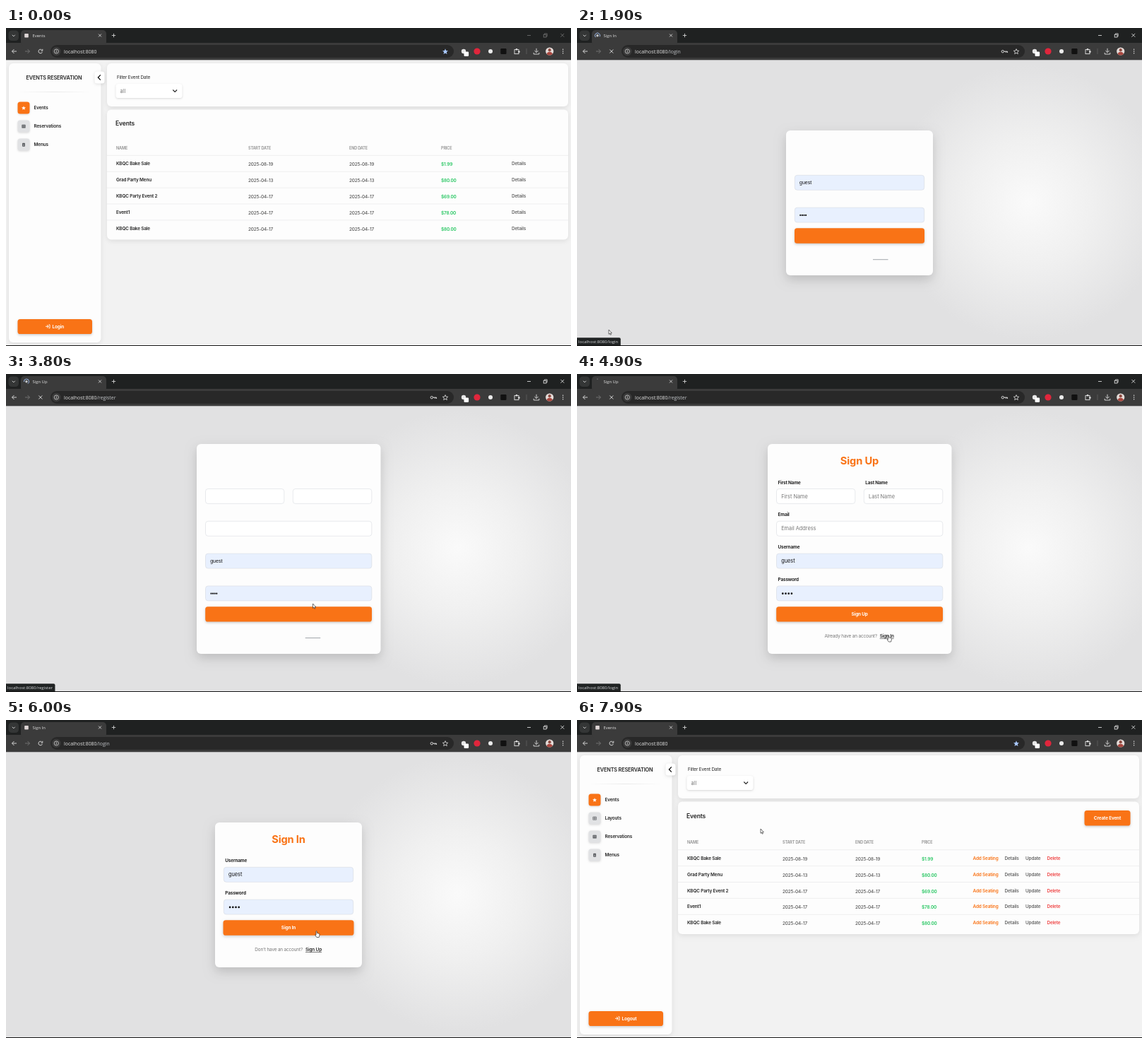
Animation, 800 px wide and 450 px high, one loop 8 s. Source, as an HTML page with a canvas:

```html
<!DOCTYPE html>
<html lang="en">
<head>
<meta charset="utf-8">
<title>Events Reservation</title>
<style>
html, body { margin: 0; width: 100%; height: 100%; overflow: hidden; background: #f2f2f2; }
canvas { display: block; width: 800px; height: 450px; }
</style>
</head>
<body>
<canvas id="stage"></canvas>
<script>
const canvas = document.getElementById('stage');
const ctx = canvas.getContext('2d');
const dpr = window.devicePixelRatio || 1;
canvas.width = 800 * dpr;
canvas.height = 450 * dpr;

const LOOP = 8000;
const INTER = 'Inter, "Liberation Sans", sans-serif';
const UI = '"Open Sans", "Noto Sans", sans-serif';
const ORANGE = '#f97316', INK = '#222', GRAY = '#666', GREEN = '#22c55e', RED = '#ef4444';
const USER = 'guest';

// time, x, y of the pointer tip
const PATH = [
  [100, 768, 13], [900, 45, 427], [2200, 45, 427], [3200, 434.5, 325],
  [3950, 434.5, 325], [4500, 441, 370], [5500, 441, 370],
  [6100, 439.5, 293], [7200, 439.5, 293], [7900, 260, 154]
];

// start, view, ready (web fonts present)
const PAGES = [
  [0, 'events', true], [1900, 'login', false], [2100, 'login', true],
  [3700, 'register', false], [3900, 'register', true],
  [5000, 'login', false], [5200, 'login', true],
  [6600, 'blank', false], [6800, 'manage', false], [6900, 'manage', true]
];

// click, commit, end of loading
const LOADS = [[1700, 1900, 2300], [3600, 3700, 4100], [4900, 5000, 5400], [6300, 6600, 7100]];
const STATUS = [[1000, 2200, '/login'], [3300, 4000, '/register'], [4600, 5300, '/login']];
const HANDS = [[850, 1900], [3100, 3700], [4450, 5000], [5950, 6600]];

const within = (t, a, b) => t >= a && t < b;
const clamp = v => Math.max(0, Math.min(1, v));
const ease = v => v * v * (3 - 2 * v);
const hover = (t, a, b) => ease(clamp((t - a) / 150)) * (t < b ? 1 : 0);

function text(s, x, y, size, o = {}) {
  ctx.font = `${o.weight || 400} ${size}px ${o.font || INTER}`;
  ctx.letterSpacing = (o.ls === undefined ? -0.16 : o.ls) + 'px';
  ctx.textAlign = o.align || 'left';
  ctx.fillStyle = o.color || INK;
  ctx.fillText(s, x, y + size * 0.364);
  return ctx.measureText(s).width;
}
const ui = (s, x, y, size, color) => text(s, x, y, size, { font: UI, ls: 0, color });

function box(x, y, w, h, r, fill, shadow, stroke) {
  ctx.save();
  if (shadow) {
    ctx.shadowColor = shadow[0];
    ctx.shadowOffsetY = shadow[1] * dpr;
    ctx.shadowBlur = shadow[2] * dpr;
  }
  ctx.beginPath();
  ctx.roundRect(x, y, w, h, r);
  ctx.fillStyle = fill;
  ctx.fill();
  ctx.restore();
  if (stroke) {
    ctx.strokeStyle = stroke;
    ctx.lineWidth = 0.5;
    ctx.stroke();
  }
}

function line(color, width, ...pts) {
  ctx.beginPath();
  for (let i = 0; i < pts.length; i += 2) ctx.lineTo(pts[i], pts[i + 1]);
  ctx.strokeStyle = color;
  ctx.lineWidth = width;
  ctx.stroke();
}

function disc(x, y, r, fill) {
  ctx.beginPath();
  ctx.arc(x, y, r, 0, Math.PI * 2);
  ctx.fillStyle = fill;
  ctx.fill();
}

function arc(x, y, r, a, b, color, width) {
  ctx.beginPath();
  ctx.arc(x, y, r, a, b);
  ctx.strokeStyle = color;
  ctx.lineWidth = width;
  ctx.stroke();
}

function star(x, y, r, fill, stroke) {
  ctx.beginPath();
  for (let i = 0; i < 10; i++) {
    const a = -Math.PI / 2 + i * Math.PI / 5, d = i % 2 ? r * 0.45 : r;
    ctx.lineTo(x + d * Math.cos(a), y + d * Math.sin(a));
  }
  ctx.closePath();
  if (fill) { ctx.fillStyle = fill; ctx.fill(); }
  if (stroke) { ctx.strokeStyle = stroke; ctx.lineWidth = 0.8; ctx.stroke(); }
}

function cross(x, y, r, color, width) {
  line(color, width, x - r, y - r, x + r, y + r);
  line(color, width, x - r, y + r, x + r, y - r);
}

function button(x, y, w, h, label, lift = 0) {
  const cx = x + w / 2, cy = y + h / 2, k = 1 + 0.02 * lift;
  ctx.save();
  ctx.translate(cx, cy);
  ctx.scale(k, k);
  ctx.translate(-cx, -cy);
  box(x, y, w, h, 3.6, ORANGE, ['rgba(0,0,0,.2)', 1.5, 3.5 + 2 * lift]);
  if (label) text(label, cx, cy, 6.42, { weight: 700, color: '#fff', align: 'center' });
  ctx.restore();
}

// ---- browser window ----

function tabIcon(t, load, view) {
  const x = 29, y = 10.7;
  if (!load) {
    box(x - 2.8, y - 2.8, 5.6, 5.6, 0.8, '#ded6d6');
    return;
  }
  if (t < load[1]) {
    const a = -Math.PI / 2 + (t - load[0]) / 260;
    arc(x, y, 3.6, a - 0.15, a + 0.12 + (t - load[0]) / 400, '#b8bcc2', 0.8);
    return;
  }
  const a = (t - load[1]) / 160 + 2.4;
  arc(x, y, 3.6, a, a + 4.3, '#a8c7fa', 0.9);
  disc(x, y, 1.7, view === 'blank' ? '#a9b8cc' : '#c4c7ca');
}

function chrome(t, view, load) {
  const main = view === 'events' || view === 'manage' || view === 'blank';
  const path = main ? '' : '/' + view;
  const titles = { events: 'Events', manage: 'Events', login: 'Sign In', register: 'Sign Up', blank: 'localhost:8080' };
  const white = '#e3e3e3';

  ctx.fillStyle = '#1f2121';
  ctx.fillRect(0, 0, 800, 22);
  ctx.fillStyle = '#3b3b3b';
  ctx.fillRect(0, 21, 800, 24.3);
  box(21, 3, 121, 22, 5, '#3b3b3b');
  box(3.5, 3.5, 14.5, 14.5, 4.5, '#343636');
  line(white, 0.9, 8.8, 9.8, 10.8, 11.8, 12.8, 9.8);
  tabIcon(t, load, view);
  ui(titles[view], 37.5, 10.8, 5.9, white);
  cross(133, 10.5, 2, white, 0.8);
  line(white, 0.8, 149.8, 10.5, 155.2, 10.5);
  line(white, 0.8, 152.5, 7.8, 152.5, 13.2);

  const win = t < 1700 ? '#777' : '#eee';
  line(win, 0.8, 738, 10.5, 743, 10.5);
  ctx.strokeRect(761.2, 9.2, 3.8, 3.8);
  line(win, 0.7, 762.5, 9, 762.5, 7.9, 766.2, 7.9, 766.2, 11.7, 765, 11.7);
  cross(787.8, 10.3, 2.4, win, 0.8);

  line(white, 0.9, 11.5, 30, 8.5, 33, 11.5, 36);
  line(white, 0.9, 8.6, 33, 15, 33);
  line('#777', 0.9, 30.5, 30, 33.5, 33, 30.5, 36);
  line('#777', 0.9, 27, 33, 33.4, 33);
  if (load) cross(48.8, 33, 2.5, white, 0.9);
  else {
    arc(48.8, 33, 2.8, 0.3, 5.5, white, 0.9);
    line(white, 0.9, 51.8, 29.8, 51.8, 32.2, 49.4, 32.2);
  }

  box(63, 24, 571, 18, 9, '#282828');
  disc(71.3, 33, 6.2, '#3b3b3b');
  arc(71.3, 33, 3.1, 0, 7, white, 0.7);
  line(white, 0.8, 71.3, 32.5, 71.3, 34.7);
  disc(71.3, 31.2, 0.5, white);
  const w = ui('localhost:8080', 82, 33.2, 6.9, white);
  if (path) ui(path, 82 + w, 33.2, 6.9, '#c3c6ca');
  if (main) star(622, 33.5, 4.2, '#a8c7fa');
  else {
    star(622, 33.5, 3.9, null, white);
    arc(602.8, 33.2, 1.7, 0, 7, white, 0.9);
    line(white, 1, 604.5, 33.2, 609.5, 33.2, 609.5, 35);
    line(white, 1, 607.5, 33.2, 607.5, 34.8);
  }

  disc(648, 33, 3.2, '#e6e6e6');
  box(648.5, 33.5, 6.6, 6.6, 1.3, '#fff');
  disc(667, 33, 4.6, '#e0263c');
  disc(686, 33, 3, '#ececec');
  box(700.3, 29, 8.2, 8, 1.2, '#111');
  ctx.strokeStyle = white;
  ctx.lineWidth = 0.9;
  ctx.strokeRect(720, 30.6, 6, 6);
  disc(723, 30.3, 1.3, white);
  disc(726.4, 33.6, 1.3, white);
  line('#666', 0.7, 737, 29, 737, 37);
  line(white, 0.9, 751, 28.8, 751, 34.4);
  line(white, 0.9, 748.4, 32, 751, 34.6, 753.6, 32);
  line(white, 0.9, 747.2, 34.8, 747.2, 37, 754.8, 37, 754.8, 34.8);

  ctx.save();
  ctx.beginPath();
  ctx.arc(769.7, 33, 5.6, 0, 7);
  ctx.clip();
  ctx.fillStyle = '#e5dcd9';
  ctx.fillRect(763, 26, 14, 14);
  disc(769.7, 31.2, 2.1, '#8c4a40');
  disc(769.7, 38.2, 4.5, '#a8473f');
  ctx.restore();
  for (const dy of [-2.7, 0, 2.7]) disc(788.6, 33 + dy, 0.75, white);
}

// ---- events view ----

function sideIcon(kind, x, y) {
  const c = '#55585c', gap = '#e3e4e6';
  if (kind === 'star') return star(x, y + 0.3, 3.1, '#fff');
  if (kind === 'menu') {
    box(x - 1.9, y - 2.3, 3.8, 5, 0.6, c);
    line(gap, 0.5, x - 1, y, x + 1, y);
    return line(gap, 0.5, x - 1, y + 1.2, x + 1, y + 1.2);
  }
  box(x - 2.6, y - 2.2, 5.2, 4.8, 0.6, c);
  if (kind === 'grid') {
    ctx.fillStyle = gap;
    for (const dx of [-1.9, 0.4])
      for (const dy of [-1.5, 0.5]) ctx.fillRect(x + dx, y + dy, 1.5, 1.3);
  } else {
    line(gap, 0.5, x - 2, y - 0.8, x + 2, y - 0.8);
    line(gap, 0.4, x - 2, y + 0.9, x + 2, y + 0.9);
  }
}

function eventsView(t, full, ready) {
  const soft = ['rgba(0,0,0,.09)', 2, 7];
  const bold = { weight: 600 };
  ctx.fillStyle = '#f2f2f2';
  ctx.fillRect(0, 45, 800, 405);

  box(4, 50, 130.5, 395, 6, '#fdfdfd', soft);
  box(143, 50, 653, 61, 6, '#fdfdfd', soft);
  const top = full ? 3.4 : 0;
  box(143, 115.5, 653, 184 + top, 6, '#fdfdfd', soft);

  const fade = ctx.createLinearGradient(16, 0, 122, 0);
  fade.addColorStop(0, 'rgba(0,0,0,0)');
  fade.addColorStop(0.5, 'rgba(0,0,0,.13)');
  fade.addColorStop(1, 'rgba(0,0,0,0)');
  line(fade, 0.6, 16, 90.5, 122, 90.5);
  box(125.5, 61.5, 14, 17, 3.5, '#fff', ['rgba(0,0,0,.13)', 1, 4]);
  line('#111', 1.3, 133.8, 66.4, 130.4, 70, 133.8, 73.6);

  const nav = [['star', 'Events'], ['cal', 'Reservations'], ['menu', 'Menus']];
  if (full) nav.splice(1, 0, ['grid', 'Layouts']);
  nav.forEach(([kind, label], i) => {
    const y = 113 + i * 26;
    box(16.5, y - 8.6, 17, 17.2, 3.6, i ? '#e1e2e4' : ORANGE, ['rgba(0,0,0,.14)', 1, 3]);
    sideIcon(kind, 25, y);
    if (ready) text(label, 39.5, y - 0.5, 6.42, bold);
  });

  const lift = full ? 0 : hover(t, 850, 1900);
  button(16.5, 412, 105.5, 21, '', lift);
  if (ready) {
    const x = full ? 57 : 59;
    text(full ? 'Logout' : 'Login', x + 6.6, 422.5, 6.42, { weight: 700, color: '#fff' });
    line('#fff', 1, x - 2.8, 422.3, x + 1, 422.3);
    line('#fff', 1, x - 0.8, 420.2, x + 1.3, 422.3, x - 0.8, 424.4);
    line('#fff', 0.9, x + 1.4, 419.9, x + 3, 419.9, x + 3, 424.7, x + 1.4, 424.7);
  }

  box(155.5, 79, 94, 20, 3.6, '#fff', ['rgba(0,0,0,.15)', 1, 3]);
  line('#222', 1.1, 236.3, 87.5, 239.2, 90.4, 242.1, 87.5);
  if (full) button(718.5, 128, 65, 21.5, ready ? 'Create Event' : '');

  for (let i = 0; i < 5; i++) {
    const y = 180.3 + top + i * 22.9;
    line('#e4e4e6', 0.6, 143, y, 796, y);
  }
  if (!ready) return;

  text('EVENTS RESERVATION', 28.5, 70, 7.33, bold);
  text('Filter Event Date', 157, 69.5, 6.42);
  text('all', 161.5, 89, 7.33, { color: '#777', ls: 0 });
  text('Events', 155, 134.5 + top / 2, 8.6, bold);

  const cols = full ? [156, 291, 394, 488] : [156, 343, 486, 616];
  ['NAME', 'START DATE', 'END DATE', 'PRICE'].forEach((s, i) =>
    text(s, cols[i], 169.8 + top, 5.5, { weight: 700, color: '#999' }));

  const rows = [
    ['KBQC Bake Sale', '2025-08-19', '$1.99'], ['Grad Party Menu', '2025-04-13', '$80.00'],
    ['KBQC Party Event 2', '2025-04-17', '$69.00'], ['Event1', '2025-04-17', '$78.00'],
    ['KBQC Bake Sale', '2025-04-17', '$80.00']
  ];
  const actions = full
    ? [['Add Seating', 560.5, ORANGE], ['Details', 605.5, GRAY], ['Update', 635, GRAY], ['Delete', 665.5, RED]]
    : [['Details', 716, GRAY]];
  rows.forEach(([name, date, price], i) => {
    const y = 192 + top + i * 22.9;
    text(name, cols[0], y, 6.42, bold);
    text(date, cols[1], y + 1, 6.42, { weight: 500, color: '#555' });
    text(date, cols[2], y + 1, 6.42, { weight: 500, color: '#555' });
    text(price, cols[3], y + 1, 6.42, { weight: 600, color: GREEN });
    for (const [s, x, color] of actions) text(s, x, y, 6.42, { weight: 600, color });
  });
}

// ---- sign-in and sign-up views ----

function backdrop() {
  ctx.fillStyle = '#e1e1e2';
  ctx.fillRect(0, 45, 800, 405);
  const g = ctx.createRadialGradient(640, 247, 0, 640, 247, 195);
  g.addColorStop(0, '#fafafa');
  g.addColorStop(0.45, '#f0f0f0');
  g.addColorStop(1, '#e1e1e2');
  ctx.fillStyle = g;
  ctx.fillRect(440, 45, 360, 405);
}

function field(x, y, w, label, value, filled, ready) {
  box(x, y, w, 21, 3.6, filled ? '#e8f0fe' : '#fff', null, '#d0d4da');
  if (ready) text(label, x + 2, y - 9.3, 6.42, { weight: 700 });
  if (value === '*') {
    for (let i = 0; i < 4; i++)
      disc(x + (ready ? 8.8 : 8) + i * (ready ? 4.2 : 2.6), y + 10.8, ready ? 1.35 : 1.1, '#111');
  } else if (filled) {
    text(value, x + 6.7, y + 10.4, ready ? 7.33 : 7,
      { ls: 0, color: '#111', font: ready ? INTER : '"Liberation Sans", Arial, sans-serif' });
  } else if (ready) {
    text(value, x + 6.7, y + 10.4, 7.33, { ls: 0, color: '#777' });
  }
}

function footer(ask, link, y, x, linkX, ready) {
  if (!ready) return line('#7a8288', 0.7, linkX - 5, y + 2.7, linkX + 16.5, y + 2.7);
  text(ask, x, y, 6.42, { color: '#777' });
  const w = text(link, linkX, y, 6.42, { weight: 600 });
  line('#222', 0.6, linkX, y + 3.5, linkX + w, y + 3.5);
}

function formView(t, view, ready) {
  const card = ['rgba(0,0,0,.16)', 6, 15];
  const heading = { weight: 700, color: ORANGE, align: 'center' };
  backdrop();
  if (view === 'login') {
    box(296, 145, 208, 205, 6, '#fdfdfd', card);
    if (ready) text('Sign In', 400, 168.3, 14.67, heading);
    field(308.3, 208.3, 183.4, 'Username', USER, true, ready);
    field(308.3, 254.1, 183.4, 'Password', '*', true, ready);
    button(308, 283.3, 184, 21.5, ready ? 'Sign In' : '', hover(t, 5950, 6600));
    footer("Don't have an account?", 'Sign Up', 325, 352.3, 424, ready);
  } else {
    box(270, 99, 260.5, 297, 6, '#fdfdfd', card);
    if (ready) text('Sign Up', 400, 122.5, 14.67, heading);
    field(282.5, 162.5, 111.3, 'First Name', 'First Name', false, ready);
    field(406.3, 162.5, 111.5, 'Last Name', 'Last Name', false, ready);
    field(282.5, 208.3, 235.3, 'Email', 'Email Address', false, ready);
    field(282.5, 254.1, 235.3, 'Username', USER, true, ready);
    field(282.5, 299.9, 235.3, 'Password', '*', true, ready);
    button(282.2, 329.2, 235.8, 21.3, ready ? 'Sign Up' : '');
    footer('Already have an account?', 'Sign In', 370.8, 350.5, 428.7, ready);
  }
}

// ---- overlays ----

function statusBar(t) {
  const s = STATUS.find(([a, b]) => within(t, a, b));
  if (!s) return;
  const label = 'localhost:8080' + s[2];
  ctx.font = `400 6px ${UI}`;
  ctx.letterSpacing = '0px';
  box(0, 438.3, ctx.measureText(label).width + 5.5, 11, [0, 2, 0, 0], '#202323');
  ui(label, 2, 444, 6, '#d5d7da');
}

function shape(pts) {
  ctx.beginPath();
  for (let i = 0; i < pts.length; i += 2) ctx.lineTo(pts[i], pts[i + 1]);
  ctx.closePath();
  ctx.fillStyle = '#fff';
  ctx.fill();
  ctx.strokeStyle = '#222';
  ctx.lineWidth = 0.65;
  ctx.lineJoin = 'round';
  ctx.stroke();
  ctx.lineJoin = 'miter';
}

function pointer(t) {
  if (t < PATH[0][0]) return;
  let i = PATH.findIndex(p => p[0] > t);
  if (i < 0) i = PATH.length;
  const a = PATH[i - 1], b = PATH[i] || a;
  const k = a === b ? 0 : ease((t - a[0]) / (b[0] - a[0]));
  ctx.save();
  ctx.translate(a[1] + (b[1] - a[1]) * k, a[2] + (b[2] - a[2]) * k);
  if (HANDS.some(([s, e]) => within(t, s, e)))
    shape([-0.6, 0.4, 0, 0, 0.7, 0.5, 0.8, 3, 3.8, 3.7, 4.4, 4.5, 4.1, 7, 3.5, 9, 0.4, 9, -1.9, 5.9, -1.5, 5.2, -0.6, 5.8]);
  else
    shape([0, 0, 0, 6.3, 1.4, 5.1, 2.4, 7.2, 3.4, 6.8, 2.5, 4.7, 4.3, 4.6]);
  ctx.restore();
}

function draw(t) {
  ctx.setTransform(dpr, 0, 0, dpr, 0, 0);
  const [, view, ready] = PAGES.filter(p => p[0] <= t).pop();
  const load = LOADS.find(([a, , c]) => within(t, a, c));
  if (view === 'blank') {
    ctx.fillStyle = '#f2f2f2';
    ctx.fillRect(0, 45, 800, 405);
  } else if (view === 'events' || view === 'manage') {
    eventsView(t, view === 'manage', ready);
  } else {
    formView(t, view, ready);
  }
  chrome(t, view, load);
  statusBar(t);
  ctx.fillStyle = '#161616';
  ctx.fillRect(0, 449, 800, 1);
  pointer(t);
}

const start = performance.now();
function tick() {
  draw((performance.now() - start) % LOOP);
  requestAnimationFrame(tick);
}
tick();
</script>
</body>
</html>
```
